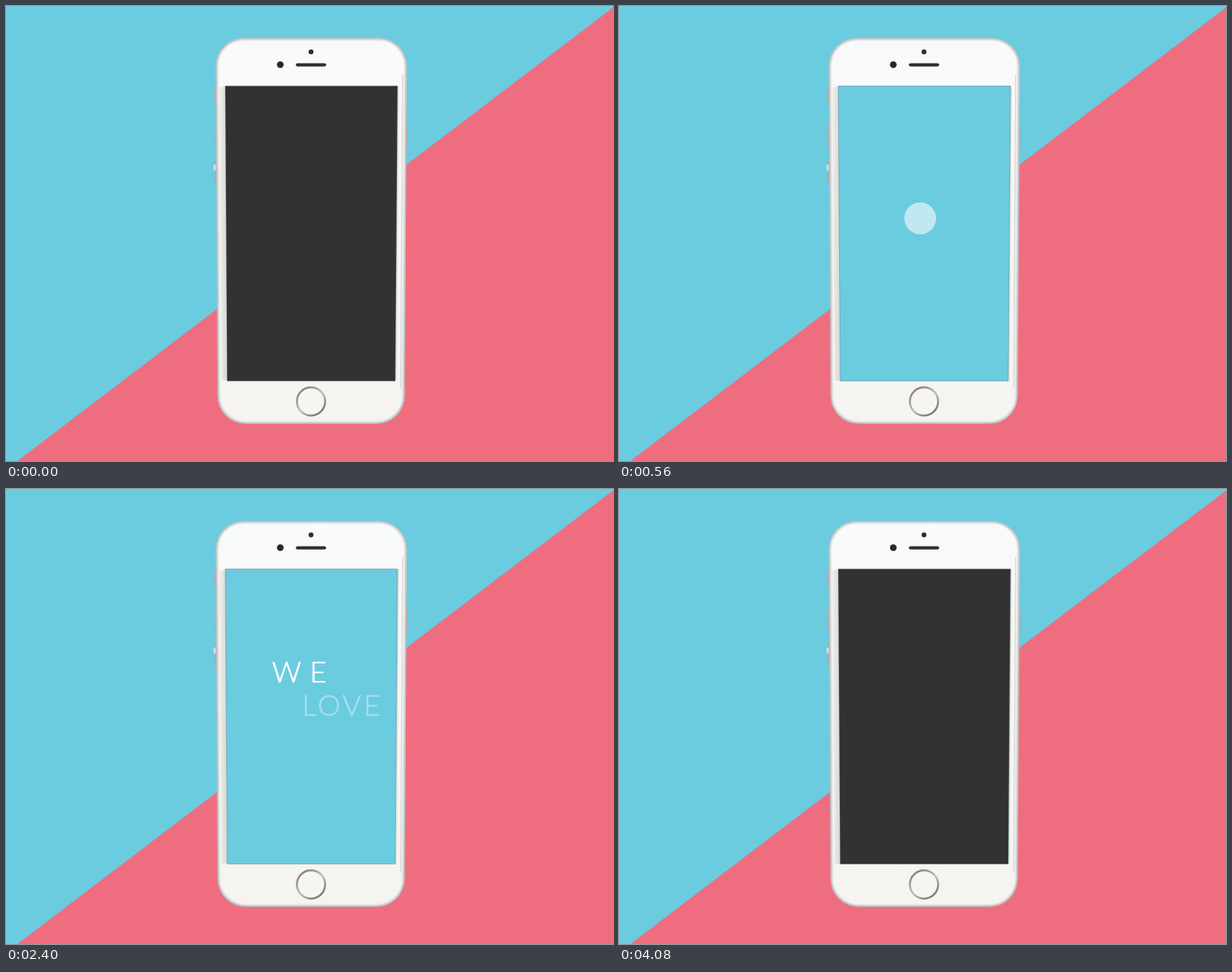
Animation of 800 by 600 pixels, one loop 4.92 s. Source, as an HTML page with a canvas:

```html
<!DOCTYPE html>
<html lang="en">
<head>
<meta charset="utf-8">
<title>Phone splash screen</title>
<style>
  html, body { margin: 0; width: 100%; height: 100%; overflow: hidden; background: #6bcbdf; }
  canvas { display: block; width: 800px; height: 600px; }
</style>
</head>
<body>
<canvas id="stage" width="800" height="600"></canvas>
<script>
const ctx = document.getElementById('stage').getContext('2d');
const LOOP = 4920, STEP = 40;
const BLUE = [107, 203, 223], PINK = '#ee6e80', DARK = [50, 50, 50];

// Each line slides in from its own side; soft is the rounding stroke.
const LINES = [
  { text: 'WE', x: 350.5, y: 255, weight: 300, size: 38, soft: 0.7, gap: 11, start: 2120, dx: -60, dy: 0 },
  { text: 'LOVE', x: 351.5, y: 298.5, weight: 300, size: 38, soft: 0.7, gap: 3, start: 2320, dx: 58, dy: 0 },
  { text: 'UX/UI', x: 349.5, y: 342, weight: 700, size: 37.5, soft: 0.8, gap: 0.8, start: 2520, dx: 0, dy: 170 }
];

// Linear progress from 0 to 1 between two times.
const ramp = (t, from, to) => Math.min(1, Math.max(0, (t - from) / (to - from)));
const mix = (a, b, p) => `rgb(${a.map((v, i) => Math.round(v + (b[i] - v) * p))})`;

function polygon(points, fill) {
  ctx.beginPath();
  points.forEach(([x, y]) => ctx.lineTo(x, y));
  ctx.closePath();
  ctx.fillStyle = fill;
  ctx.fill();
}

function pill(x, y, w, h, r, fill) {
  ctx.beginPath();
  ctx.roundRect(x, y, w, h, r);
  ctx.fillStyle = fill;
  ctx.fill();
}

function disc(x, y, r, fill) {
  ctx.beginPath();
  ctx.arc(x, y, r, 0, Math.PI * 2);
  ctx.fillStyle = fill;
  ctx.fill();
}

function gradient(x0, y0, x1, y1, ...colors) {
  const g = ctx.createLinearGradient(x0, y0, x1, y1);
  colors.forEach((c, i) => g.addColorStop(i / (colors.length - 1), c));
  return g;
}

// The body narrows slightly towards the bottom.
function body(inset, fill) {
  const l = 276.3 + inset, r = 528.5 - inset, top = 42 + inset, bottom = 551 - inset;
  const lb = l + 2.5, rb = r - 3, c = 37 - inset;
  ctx.beginPath();
  ctx.moveTo(l + c, top);
  ctx.arcTo(r, top, r, top + c, c);
  ctx.lineTo(rb, bottom - c);
  ctx.arcTo(rb, bottom, rb - c, bottom, c);
  ctx.lineTo(lb + c, bottom);
  ctx.arcTo(lb, bottom, lb, bottom - c, c);
  ctx.lineTo(l, top + c);
  ctx.arcTo(l, top, l + c, top, c);
  ctx.closePath();
  ctx.fillStyle = fill;
  ctx.fill();
}

function drawPhone() {
  const metal = '#b3a9a7';
  pill(274.5, 108, 4, 20, 1, metal);
  pill(275.5, 154, 4, 34, 1, metal);
  pill(275.5, 201, 4, 34, 1, metal);
  pill(273.5, 209, 3, 8, 1, '#d9dcdc');
  pill(526, 156, 3, 34, 1, metal);

  body(0, '#c0c4c5');
  body(2, '#e6e7e5');
  body(4, gradient(0, 42, 0, 551, '#f9fafb', '#f7f6f4', '#f5f4f0'));
  polygon([[281, 108], [289, 106], [291, 494], [284.5, 494]],
    gradient(280, 0, 291, 0, '#f1f1ef', '#d8d9d5'));
  polygon([[516, 106], [518, 106], [515, 494], [513, 494]], '#e2e2de');
  polygon([[522, 90], [523.5, 90], [521, 505], [519.5, 505]], '#d9dad8');

  disc(402, 60.5, 3.2, '#302d2d');
  disc(361.5, 77.3, 4.4, '#292627');
  pill(382, 75.5, 40, 4.2, 2.1, '#342f2c');

  disc(402, 521.5, 19, '#f7f5f1');
  ctx.beginPath();
  ctx.arc(402, 521.5, 18.6, 0, Math.PI * 2);
  ctx.lineWidth = 2.6;
  ctx.strokeStyle = gradient(388, 504, 416, 540, '#7f7b75', '#c2bfb9', '#6d6963');
  ctx.stroke();
}

function drawScreen(t) {
  const lit = ramp(t, 0, 280) * (1 - ramp(t, 3800, 4080));
  polygon([[289, 105.5], [516, 105.5], [513, 494.5], [291.5, 494.5]], mix(DARK, BLUE, lit));
  ctx.lineWidth = 0.8;
  ctx.strokeStyle = 'rgba(65, 100, 110, 0.5)';
  ctx.stroke();
}

function drawLoader(t) {
  const out = 1 - ramp(t, 1600, 1840);
  if (t < 400 || out === 0) return;

  ctx.globalAlpha = ramp(t, 400, 680) * out;
  disc(397, 280, 21, '#fff');

  const fill = ramp(t, 960, 1160);
  if (fill < 1) {
    ctx.globalAlpha = ramp(t, 680, 960) * 0.4;
    pill(350, 324, 100, 11, 5.5, '#fff');
  }
  if (fill > 0) {
    ctx.globalAlpha = out;
    pill(350, 324, 100 * fill, 11, 5.5, '#fff');
  }
  ctx.globalAlpha = 1;
}

function drawText(t) {
  const out = ramp(t, 3520, 3800);
  if (out === 1) return;
  ctx.fillStyle = ctx.strokeStyle = '#fff';
  ctx.lineJoin = 'round';
  for (const line of LINES) {
    const p = ramp(t, line.start, line.start + 240);
    if (p === 0) continue;
    const x = line.x + line.dx * (1 - p) - 80 * out;
    const y = line.y + line.dy * (1 - p);
    ctx.globalAlpha = p * (1 - out);
    ctx.font = `${line.weight} ${line.size}px Lato, sans-serif`;
    ctx.letterSpacing = line.gap + 'px';
    ctx.lineWidth = line.soft;
    ctx.fillText(line.text, x, y);
    ctx.strokeText(line.text, x, y);
  }
  ctx.globalAlpha = 1;
}

function draw(t) {
  ctx.fillStyle = `rgb(${BLUE})`;
  ctx.fillRect(0, 0, 800, 600);
  polygon([[800, 2], [800, 600], [15, 600]], PINK);
  drawPhone();
  drawScreen(t);
  drawLoader(t);
  drawText(t);
}

const begin = performance.now();
function tick() {
  const t = (performance.now() - begin) % LOOP;
  draw(Math.floor(t / STEP) * STEP);
  requestAnimationFrame(tick);
}
tick();
</script>
</body>
</html>
```
